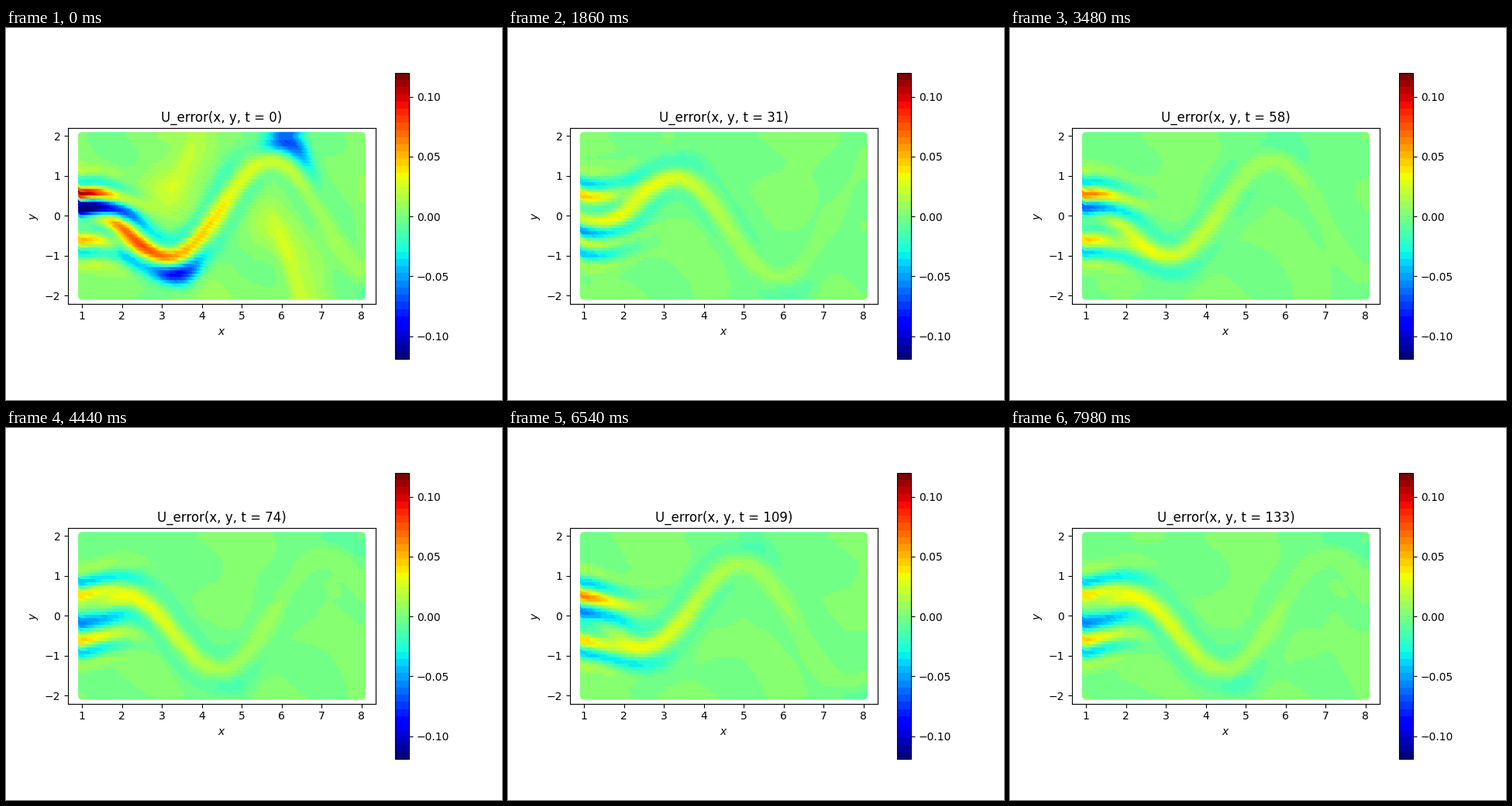
A matplotlib script for the animation above (8 s loop, 640 by 480 pixels).

```python
import numpy as np
import matplotlib.pyplot as plt
from matplotlib.animation import FuncAnimation

INTERVAL = 40        # ms per drawn frame
FRAMES = 200
STEP = 60            # ms per simulation step
PERIOD = 59          # steps per shed vortex pair
WAVELENGTH = 5.5
TROUGH = 3.0         # x of the first trough at t = 0

x, y = np.meshgrid(np.linspace(1, 8, 100), np.linspace(-2, 2, 50))
run = x - 1                                  # distance from the inlet
sway = 1.75 * (1 - np.exp(-run / 2.6))       # height of the meander
onset = 1 - np.exp(-run**2)


def bump(u, width):
    return np.exp(-(u / width)**2)


def inlet(yy, t):
    """Fixed stripes on both sides of a core that swings up and down."""
    r = np.abs(yy)
    stripes = 48 * np.cos(2 * np.pi * (r - 0.55) / 0.72) * bump(r - 0.7, 0.45)
    core = yy + 0.08 - 0.33 * np.cos(2 * np.pi * t / PERIOD)
    power = 50 + 95 * bump(t, 7) + 65 * bump(t - 90, 7)
    swing = 0.5 * bump(core - 0.36, 0.16) - bump(core, 0.2)
    return stripes * bump(run, 1.1) + power * swing * bump(run, 0.95)


def wake(eta, phase, burst):
    """Streak along the meander with negative flanks and outer lobes."""
    streak = bump(eta, 0.22) - 0.45 * (bump(eta - 0.42, 0.22) + bump(eta + 0.42, 0.22))
    u = 75 * (1 + 1.4 * burst) * np.exp(-run / 2.2) * streak
    bend = -np.cos(phase - 0.5)
    u -= (9 + 60 * burst) * bend**4 * bump(eta - 0.45 * bend, 0.28)
    u += (3 + 17 * burst) * bend**2 * bump(eta + 1.8 * bend, 0.6)
    return onset * u


def error(t):
    burst = np.exp(-t / 6)
    phase = 2 * np.pi * ((x - TROUGH) / WAVELENGTH - t / PERIOD)
    path = -sway * np.cos(phase)
    tilt = np.hypot(1, np.gradient(path, x[0], axis=1))
    ripple = 2.5 * np.sin(1.5 * phase + 2 * y) * np.cos(0.6 * phase - 1.3 * y)
    u = 0.3 + 3 * burst + (1 + burst) * ripple
    u += inlet(y - 0.4 * path, t) + wake((y - path) / tilt, phase, burst)
    return u.ravel() / 1000


fig, ax = plt.subplots(figsize=(6.4, 4.8), dpi=100)
dots = ax.scatter(x.ravel(), y.ravel(), s=7.5**2, linewidths=0, c=error(0),
                  cmap=plt.get_cmap("jet", 40), vmin=-0.119, vmax=0.12)
fig.colorbar(dots)
ax.set_aspect("equal")
ax.set_xlim(0.65, 8.35)
ax.set_ylim(-2.2, 2.2)
ax.set_xticks(range(1, 9))
ax.set_yticks(range(-2, 3))
ax.set_xlabel("$x$")
ax.set_ylabel("$y$")
title = ax.set_title("")


def update(i):
    t = (i * INTERVAL + INTERVAL // 2) // STEP
    dots.set_array(error(t))
    title.set_text(f"U_error(x, y, t = {t})")
    return dots, title


anim = FuncAnimation(fig, update, frames=FRAMES, interval=INTERVAL,
                     init_func=lambda: update(0), repeat=True, repeat_delay=0)
plt.show()
```
